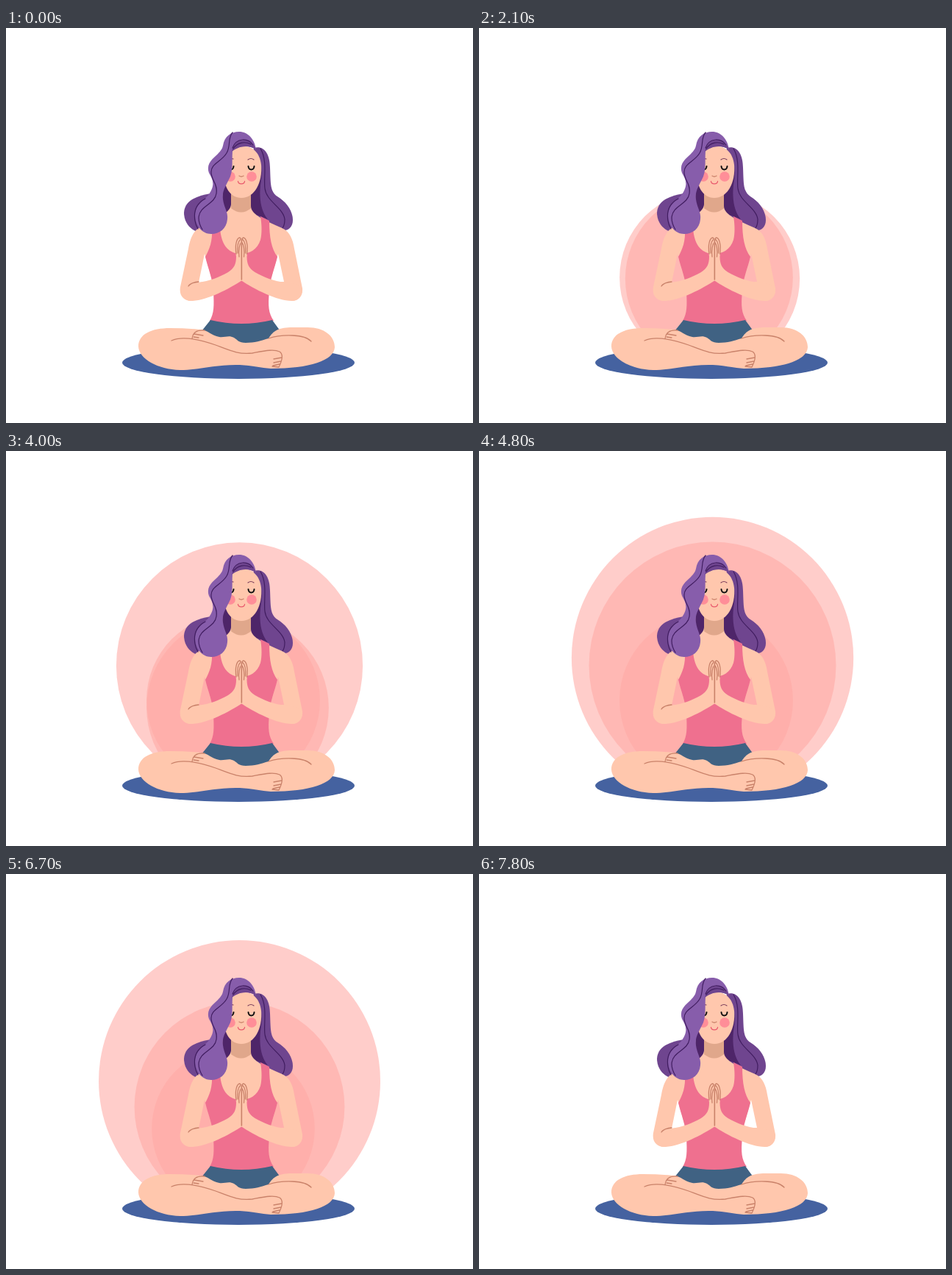
These frames come from a looping animation (635 by 537 pixels, 9.6 s). An HTML page:

```html
<!DOCTYPE html>
<html lang="en">
<head>
<meta charset="utf-8">
<title>Meditation</title>
<style>
  html, body { margin: 0; width: 100%; height: 100%; overflow: hidden; background: #fff; }
  svg { display: block; width: 100vw; height: 100vh; }
  .skin { fill: #ffc7ad; }
  .light { fill: #875dab; }
  .mid { fill: #6f458f; }
  .deep { fill: #4e2569; }
  .line { fill: none; stroke: #c9826a; stroke-width: 1.3; stroke-linecap: round; stroke-linejoin: round; }
  .strand { fill: none; stroke: #411d60; stroke-width: 1.2; stroke-linecap: round; }
</style>
</head>
<body>
<svg viewBox="0 0 635 537">
  <g id="aura" fill="#ffaaa5" fill-opacity=".59"></g>
  <ellipse cx="316" cy="455" rx="158" ry="22" fill="#4562a0"/>

  <!-- hair behind the body -->
  <path class="mid" d="M337 163C350 159 359 170 359 190C360 212 359 222 369 229C382 237 390 249 390 261C390 270 385 274 380 275L340 270L330 200Z"/>
  <path class="mid" d="M278 225C262 228 243 233 242 251C242 264 250 273 258 276L290 262Z"/>
  <path class="deep" d="M299 205C291 225 294 244 300 257L310 250V215ZM340 170C350 186 348 200 346 214C344 232 347 250 356 260L330 250V222Z"/>
  <path class="strand" d="M346 164C356 180 350 205 352 218C354 236 377 244 379 260Q379 268 376 272"/>

  <!-- torso and upper arms -->
  <path class="skin" d="M306 222V240C305 254 275 264 262 272C254 277 250 288 248 300L237 352C235 364 242 371 252 371L270 345L262 346L270 307L282 350H358L370 307L378 345L370 345L388 371C398 371 404 364 403 354L392 300C390 286 385 278 379 274C365 266 333 257 333 242V222Z"/>
  <path fill="#e0a78b" d="M306 222V245Q320 256 333 245V222Z"/>
  <path fill="#ef708f" d="M280 272C281 290 277 300 271 311C275 328 281 340 282 358C283 378 283 388 277 398Q320 407 364 398C357 388 356 378 358 358C359 340 365 328 369 311C361 300 358 285 358 262L346 256C348 268 348 280 346 288C342 301 331 307 320 307C305 307 292 298 291 270Z"/>
  <path fill="#406283" d="M278 397Q320 407 362 397L373 412L350 432H300L266 412Z"/>

  <!-- legs -->
  <path class="skin" d="M180 433C180 416 198 408 223 408Q246 408 265 410C275 411 279 418 290 420C298 421 303 417 310 421C315 424 316 428 326 428C338 428 347 425 357 422C364 411 370 408 386 407L410 407C433 407 447 419 447 434C446 452 413 463 360 463C347 462 335 459 318 458C285 457 262 465 237 465C206 464 181 450 180 433Z"/>
  <path class="line" d="M225 425C240 418 262 423 285 431C306 439 316 444 335 442C351 439 364 436 372 440C378 444 375 453 371 461L362 460M364 450L375 448M364 455L374 453M363 459L372 457M357 422C375 416 406 416 415 426M270 411C260 410 254 414 253 422M256 416L268 418M255 420L262 421"/>

  <!-- forearms and hands -->
  <g id="arm">
    <path class="skin" d="M240 350Q250 346 262 346C276 344 290 339 302 332C310 327 313 321 313 311C311 296 313 286 318 285L321 287V343C303 355 272 371 252 371C242 371 237 363 238 355Z"/>
    <path class="line" d="M313 307C311 294 314 285 318 285Q320 286 320 290V342M315 306C314 296 316 290 319 287M317 311C316 302 317 295 320 291"/>
  </g>
  <use href="#arm" transform="matrix(-1 0 0 1 640.5 0)"/>
  <path class="line" d="M248 351Q251 346 262 345"/>

  <!-- face -->
  <path class="skin" d="M305 166C324 155 344 161 347 186C349 210 338 231 320 231C305 231 296 216 297 200Z"/>
  <g fill="#ff8e98"><circle cx="334" cy="202" r="6.8"/><circle cx="305" cy="202" r="6.8"/></g>
  <path fill="none" stroke="#111" stroke-width="2" stroke-linecap="round" d="M329.5 188C330 194 337 194 337.5 188M302 188C302 194 309 194 309.5 188"/>
  <path fill="none" stroke="#7b3e5c" stroke-width="1.2" stroke-linecap="round" d="M329 179Q333 176 337 179M303 179Q306 177 309 178"/>
  <path class="line" d="M317 201Q320 203 323 201"/>
  <path fill="none" stroke="#e9596c" stroke-width="1.3" stroke-linecap="round" d="M315.5 208.5C316 213 324 213 324.5 208.5"/>

  <!-- hair in front -->
  <path class="light" d="M295 160C297 147 306 141 317 141C329 141 338 151 340 165C330 159 318 159 308 167C307 180 309 191 305 202C300 213 293 222 295 233C297 246 302 249 301 260C300 273 290 280 279 280C267 280 257 269 257 254C257 240 270 234 276 226C285 213 281 206 276 197C271 183 284 176 289 170Q294 165 295 160Z"/>
  <path class="mid" d="M307 168C310 148 333 148 340 165C328 158 316 161 307 168Z"/>
  <path class="strand" d="M308 142C301 150 306 160 300 170C293 182 278 184 279 197C280 208 288 212 286 225C284 240 263 241 262 258Q262 266 267 274M271 232C258 239 255 250 257 262Q258 268 261 273M308 163C313 149 329 149 336 159M309 164C315 155 325 154 333 158"/>
</svg>
<script>
  const LOOP = 9600, STEP = 100, SHRINK = 6400;
  // each disc scales from a point near its bottom edge
  const discs = [
    { x: 309, drift: 0, base: 457, r: 118, start: 500, tau: 238, out: 2000 },
    { x: 317.5, drift: 0, base: 459.5, r: 168, start: 1610, tau: 400, out: 1230 },
    { x: 310.3, drift: 7.7, base: 473, r: 204, start: 3600, tau: 428, out: 2000 }
  ];
  const aura = document.getElementById('aura');
  for (const d of discs) {
    d.el = aura.appendChild(document.createElementNS('http://www.w3.org/2000/svg', 'circle'));
  }

  const clamp = v => Math.min(1, Math.max(0, v));
  const smooth = v => v * v * (3 - 2 * v);

  function draw(now) {
    const t = Math.floor(now % LOOP / STEP) * STEP;
    for (const d of discs) {
      const grow = 1 - Math.exp(-Math.max(0, t - d.start) / d.tau);
      const scale = grow * (1 - smooth(clamp((t - SHRINK) / d.out)));
      const r = d.r * scale;
      d.el.setAttribute('cx', d.x + d.drift * scale);
      d.el.setAttribute('cy', d.base - r);
      d.el.setAttribute('r', r);
    }
  }

  const begin = performance.now();
  function tick() {
    draw(performance.now() - begin);
    requestAnimationFrame(tick);
  }
  tick();
</script>
</body>
</html>
```
